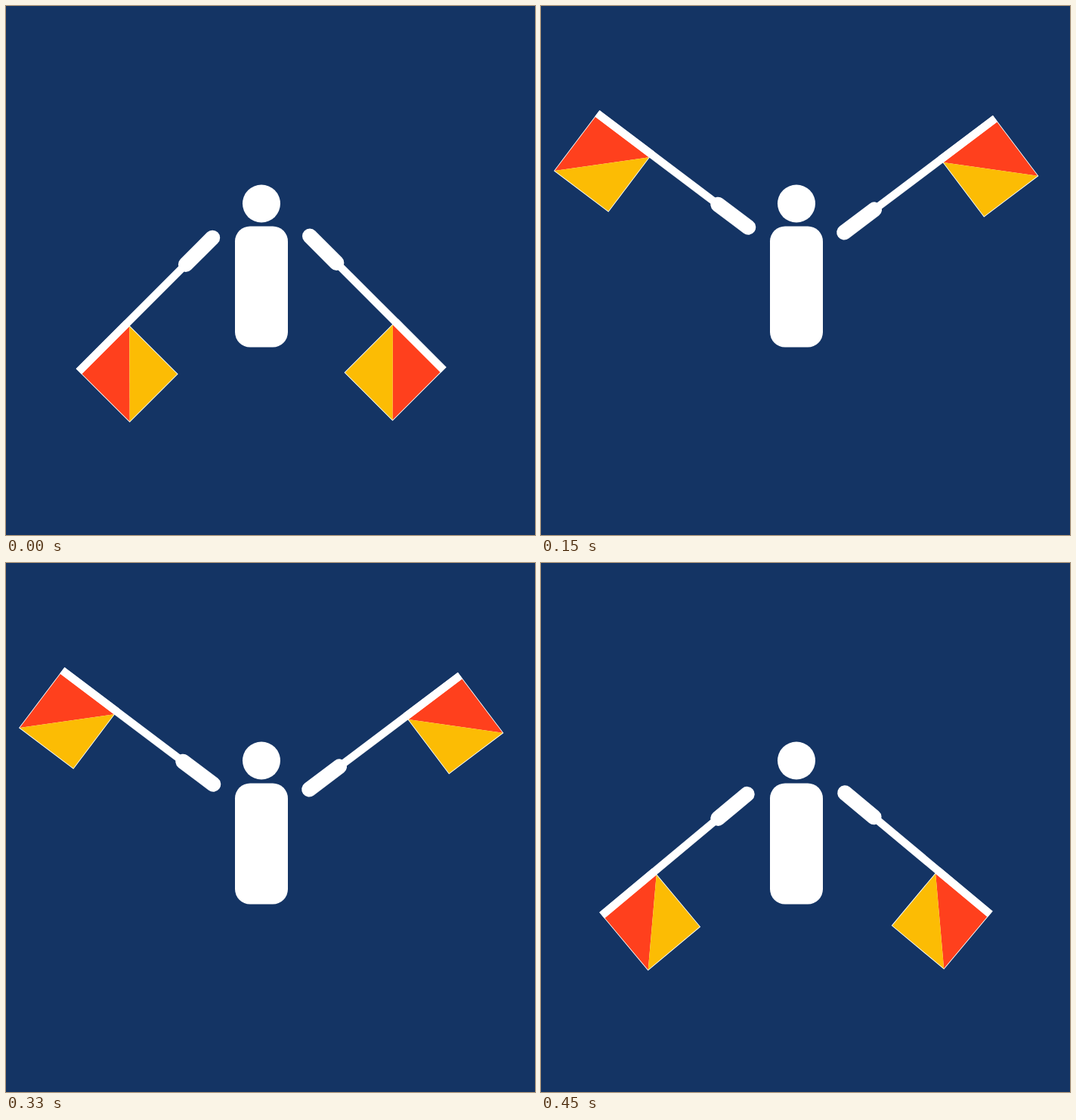
Recreate the animation shown at these times as an HTML page. Size 700x700 px, loop 0.48 s.

```html
<!DOCTYPE html>
<html lang="en">
<head>
<meta charset="utf-8">
<title>Semaphore</title>
<style>
  html, body { margin: 0; width: 100%; height: 100%; overflow: hidden; background: #143464; }
  svg { display: block; width: 100%; height: 100%; }
</style>
</head>
<body>
<svg viewBox="0 0 700 700" fill="#fff">
  <defs>
    <!-- arm pointing right, shoulder at the origin -->
    <g id="arm">
      <rect x="170.2" y="-6.6" width="90.6" height="100.5"/>
      <path d="M171.1 3.7H259.9V93Z" fill="#ff401d"/>
      <path d="M171.1 3.7V93H259.9Z" fill="#fcbc04"/>
      <rect x="60" y="-6.6" width="200.8" height="10.3"/>
      <rect x=".5" y="-11.5" width="70" height="20" rx="10"/>
    </g>
  </defs>
  <rect width="700" height="700" fill="#143464"/>
  <circle cx="338" cy="261.5" r="25"/>
  <rect x="303" y="291.5" width="70" height="160" rx="20"/>
  <g transform="translate(281.7 300.3) scale(-1 1)">
    <g class="swing"><use href="#arm"/></g>
  </g>
  <g transform="translate(398.7 302.5)">
    <g class="swing"><use href="#arm" x="-6.7" y=".6"/></g>
  </g>
</svg>
<script>
  const LOOP = 480, STEP = 30, LOW = -45, HIGH = 75;
  const arms = document.querySelectorAll('.swing');
  const ease = p => p * p * (3 - 2 * p);

  // The motion is held for STEP ms at a time.
  function draw(now) {
    const t = Math.floor(now / STEP + 0.01) * STEP % LOOP;
    const p = 1 - Math.abs(1 - t / (LOOP / 2));
    const angle = LOW + (HIGH - LOW) * ease(p);
    for (const arm of arms) arm.setAttribute('transform', `rotate(${-angle})`);
  }

  function tick(now) {
    draw(now);
    requestAnimationFrame(tick);
  }

  draw(0);
  requestAnimationFrame(tick);
</script>
</body>
</html>
```
